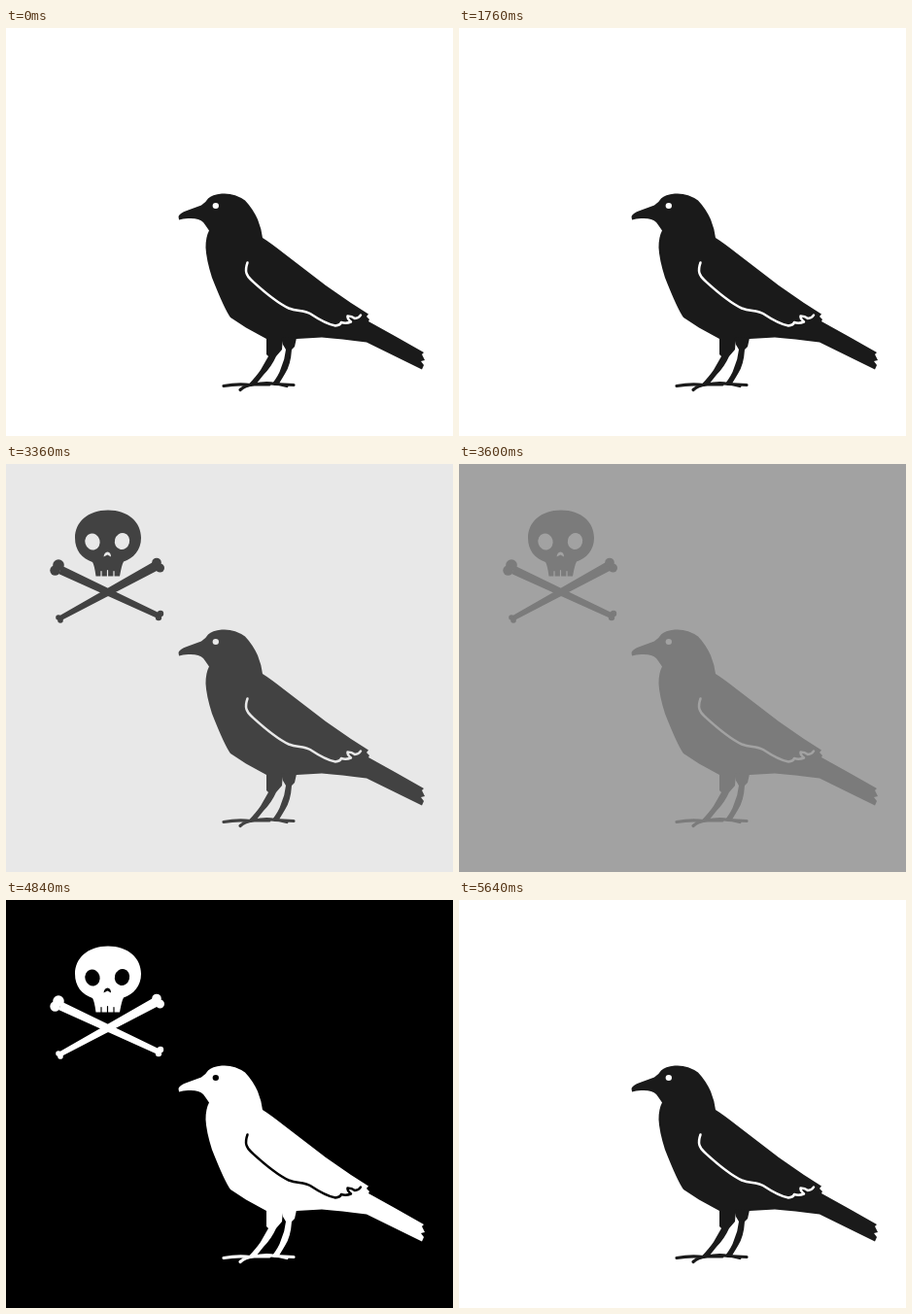
Animation of 460x420 px, one loop 5760 ms. Source, as an HTML page:

```html
<!DOCTYPE html>
<html lang="en">
<head>
<meta charset="utf-8">
<title>Crow and berries</title>
<style>
@property --ink { syntax: '<color>'; inherits: true; initial-value: #1a1a1a; }
@property --paper { syntax: '<color>'; inherits: true; initial-value: #fff; }

html, body { margin: 0; width: 100%; height: 100%; overflow: hidden; background: #fff; }
svg { position: absolute; left: 0; top: 0; width: 460px; height: 420px; display: block; }
.ink { fill: var(--ink); }
.paper { fill: var(--paper); }
.cut { fill: none; stroke: var(--paper); stroke-linecap: round; stroke-linejoin: round; }
.limb { fill: none; stroke: var(--ink); stroke-linecap: round; stroke-linejoin: round; }

/* One loop is 5760 ms, so 1% is 57.6 ms. */
.scene { animation: invert 5760ms linear infinite, wipe 5760ms linear infinite; }
.berries {
  transform-box: view-box; transform-origin: 0 0;
  animation: drift 5760ms linear infinite, sway 5760ms ease-in-out infinite, show 5760ms linear infinite;
}
.skull {
  transform-box: view-box; transform-origin: 104px 106px;
  animation: spin 5760ms linear infinite;
}

@keyframes invert {
  0%, 56.943% { --ink: #1a1a1a; --paper: #fff; }
  56.944% { --ink: #2f2f2f; --paper: #fff; animation-timing-function: steps(11); }
  72.222%, 100% { --ink: #fff; --paper: #000; }
}
@keyframes wipe {
  0%, 84.03% { clip-path: inset(0); animation-timing-function: cubic-bezier(.333, 0, .667, 1); }
  97.8%, 100% { clip-path: inset(0 0 420px 0); }
}
@keyframes drift {
  0%, 3.472% { translate: 405px 47px; scale: 1; }
  13.194% { translate: 389px 62px; scale: 1; }
  20.833% { translate: 380px 75px; scale: 1; }
  23.611% { translate: 372px 78px; scale: 1; animation-timing-function: cubic-bezier(.4, .2, .8, .8); }
  30.556%, 100% { translate: 240px 195px; scale: .3; }
}
@keyframes sway {
  0%, 6% { rotate: 0deg; }
  13.194% { rotate: -10deg; }
  20.833% { rotate: 0deg; }
  23.611% { rotate: -10deg; }
  30.556%, 100% { rotate: -40deg; }
}
@keyframes show {
  0%, 3.4% { opacity: 0; }
  5.2%, 30.55% { opacity: 1; }
  30.556%, 100% { opacity: 0; }
}
@keyframes spin {
  0%, 40.278% { rotate: -291deg; scale: 0; animation-timing-function: cubic-bezier(.333, .37, .667, .97); }
  51.389%, 84.028% { rotate: 0deg; scale: 1; animation-timing-function: cubic-bezier(.4, 0, .7, .6); }
  93.75%, 100% { rotate: 291deg; scale: 0; }
}
</style>
</head>
<body>
<svg viewBox="0 0 460 420">
  <defs>
    <g id="crow">
      <path class="ink" d="M177.5 194 Q179 190.5 186 188 L201 182.5 Q206 179 208 175.5 Q212 171.5 222 170.5 Q235 169.5 246 177.5
        Q254 186 259 197 Q263 207 264 216 Q272 221 286 232 L329 265 L355 283 L373 294.5 L371 297 L374 300 L373 302
        L400 317 L430 334 L428 336 L431 342 L427 343 L430 347 L428 351.5 L371 323.5 Q345 320 325 318.5 L299 320
        H268 L247 308.5 L231 298 Q225 290 212 257
        Q206 238 205.5 226 Q205.5 215 209 208.5 Q206 204 203 200 Q199 196 190 196 Q183 195.5 178 197.5 Z"/>
      <path class="ink" d="M268 318 L285 318 L284 331 L278 338 Q273 349 265 357 L257 367 H249.5 Q258 358 262 352 L270 338 L268 336 Z"/>
      <path class="ink" d="M283 318 L299 319 L297 328 L294 331 Q293 347 287 356 L281 366 H274 Q281 357 283 350 Q287 341 288 331 L285 326 Z"/>
      <path class="limb" stroke-width="3.2" d="M224 368.5 Q238 366 252 367.5 L262 366 Q270 365 277 366.5 L296 367.5 M254 367 Q246 368 241 372.5 M258 367 L271 367 M278 366 L289 368.5"/>
      <ellipse class="paper" cx="215.8" cy="183" rx="3.2" ry="3"/>
      <path class="cut" stroke-width="2.5" d="M248.5 241.5 C245.5 250 247 255 253 260 C264 270 277 282 291 288.500
        C300 292 306 290 313 294 C322 300 330 305 339 306.5 Q344 306 345 303 Q350 304.5 355 302.5
        Q351 299 351.500 296.500 Q356 296.500 359 299 Q363 299 365 295.500"/>
    </g>
    <g id="cross">
      <path class="ink" d="M105 47.5 C126 47.5 139 60 139 76 C139 89 131 97 121 100.5 Q119 104 117 115.500
        H92.500 Q91 104 89 101 C78 97 71 89 71 76 C71 60 84 47.5 105 47.5 Z"/>
      <ellipse class="paper" cx="89" cy="80" rx="7.6" ry="8.6" transform="rotate(-15 89 80)"/>
      <ellipse class="paper" cx="119.5" cy="79.5" rx="7.6" ry="8.6" transform="rotate(15 119.5 79.5)"/>
      <path class="paper" d="M100.5 95.5 Q101 91 104.5 90.5 Q108 91 108 95.5 L104.5 93.5 Z"/>
      <path class="cut" stroke-width="1.2" d="M98 110.5 V116 M104.5 109.5 V116 M111 110.5 V116"/>
      <path class="ink" d="M58 105 L157 153 L155 158.5 L54 113 Z M153 100 L158 108.5 L57 161 L54.5 156.5 Z"/>
      <g class="ink">
        <circle cx="54" cy="104" r="5.8"/><circle cx="50.5" cy="109.5" r="5.2"/>
        <circle cx="155" cy="101.5" r="4.8"/><circle cx="158.5" cy="107" r="4.5"/>
        <circle cx="159" cy="154" r="3.2"/><circle cx="157" cy="158" r="3.2"/>
        <circle cx="54" cy="158" r="2.8"/><circle cx="56" cy="161" r="2.8"/>
      </g>
    </g>
  </defs>
  <use href="#crow"/>
</svg>
<svg class="scene" viewBox="0 0 460 420">
  <rect class="paper" width="460" height="420"/>
  <g class="berries ink">
    <ellipse cx="5.5" cy="-37.5" rx="15.5" ry="13.8" transform="rotate(12 5.5 -37.5)"/>
    <circle cx="4.5" cy="-13.5" r="13"/>
    <ellipse cx="29" cy="-10.5" rx="14.2" ry="13.3" transform="rotate(40 29 -10.5)"/>
    <circle cx="-2" cy="8.5" r="13"/>
    <circle cx="-5" cy="31.5" r="13.3"/>
    <circle cx="-28.5" cy="39.5" r="13.5"/>
  </g>
  <g class="skull"><use href="#cross"/></g>
  <use href="#crow"/>
</svg>
</body>
</html>
```
